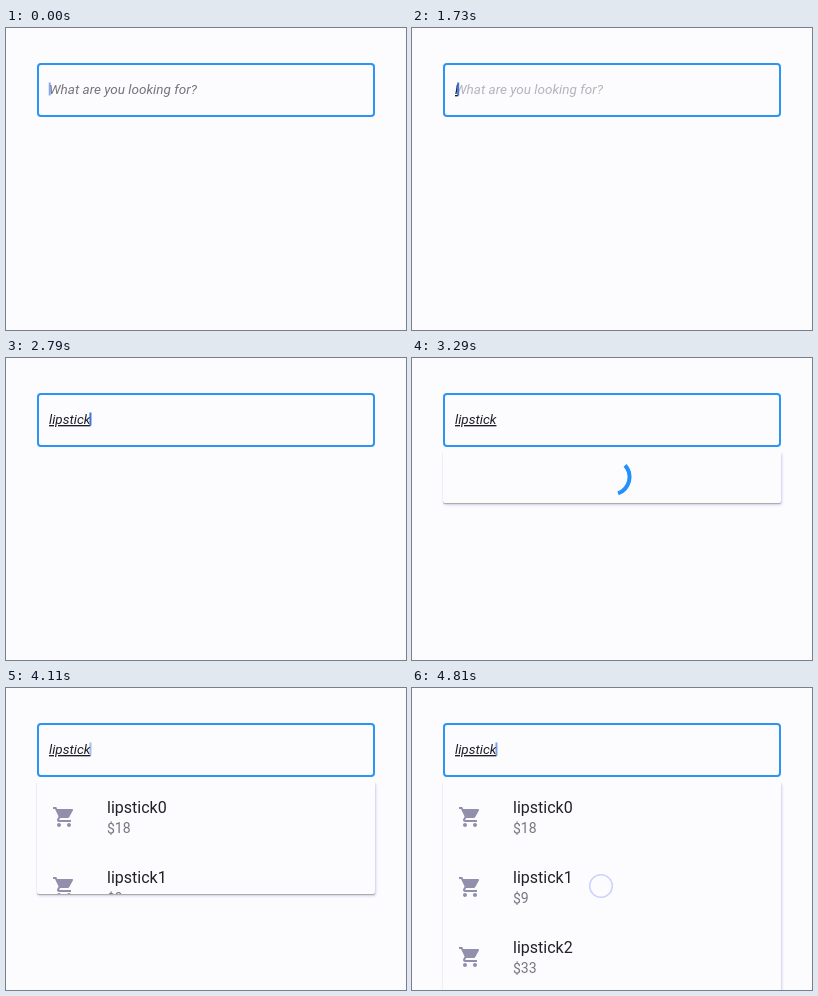
Write an HTML page that moves like this. It is 400 by 302 pixels and loops after 4850 ms.

```html
<!DOCTYPE html>
<html lang="en">
<head>
<meta charset="utf-8">
<style>
html, body { margin: 0; width: 100%; height: 100%; overflow: hidden; background: #fcfcff; }
body { position: relative; font-family: Roboto, sans-serif; }
svg { position: absolute; left: 0; top: 0; }
#panel {
  position: absolute; left: 31px; top: 94px; width: 338px; overflow: hidden;
  background: #fcfcff; border-radius: 0 0 2px 2px;
  box-shadow: 0 1px 1px #aaa89d, 1px 2px 3px #d5d0f2;
}
#panel svg { left: -31px; top: -94px; }
.field { font-size: 13.5px; font-style: italic; }
.title { font-size: 16px; fill: #212126; }
.price { font-size: 14px; fill: #77757f; }
</style>
</head>
<body>
<div id="panel">
  <svg width="400" height="310">
    <path id="spinner" fill="none" stroke="#2490fb" stroke-width="4"/>
    <g id="list"></g>
  </svg>
</div>
<svg width="400" height="302">
  <rect x="32" y="36" width="336" height="52" rx="3" fill="none" stroke="#2b94f5" stroke-width="2"/>
  <text id="hint" class="field" x="43" y="66" fill="#75747a">What are you looking for?</text>
  <text id="typed" class="field" x="43" y="66" fill="#1d1d24" text-decoration="underline"></text>
  <rect id="caret" y="54.5" width="2" height="13" fill="#3f74dc"/>
  <circle id="touch" cx="189" cy="198" r="11.3" fill="none" stroke="#cdd3fa" stroke-width="1.6"/>
</svg>
<script>
const LOOP = 4850, LOAD = 3080, RESULTS = 4055;
const WORD = "lipstick";
const KEYS = [1680, 1970, 2140, 2220, 2470, 2630, 2710, 2790];
// [time, opacity] points of the caret blink
const BLINK = [[-150, 0], [100, 1], [490, 1], [740, 0], [990, 0], [1240, 1], [1490, 1], [1679, .25], [1680, 1],
  [3040, 1], [3290, 0], [3490, 0], [3740, 1], [3980, 1], [4220, 0], [4730, 0], [4850, 1]];
const CART = "M7 18c-1.1 0-1.99.9-1.99 2S5.9 22 7 22s2-.9 2-2-.9-2-2-2zM1 2v2h2l3.6 7.59-1.35 2.45c-.16.28-.25.61-.25.96 0 1.1.9 2 2 2h12v-2H7.42c-.14 0-.25-.11-.25-.25l.03-.12.9-1.63h7.45c.75 0 1.41-.41 1.75-1.03l3.58-6.49c.08-.14.12-.31.12-.48 0-.55-.45-1-1-1H5.21l-.94-2H1zm16 16c-1.1 0-1.99.9-1.99 2s.89 2 1.99 2 2-.9 2-2-.9-2-2-2z";

const $ = id => document.getElementById(id);
const clamp = v => Math.max(0, Math.min(1, v));
const show = (id, on) => $(id).style.display = on ? "" : "none";

$("list").innerHTML = [18, 9, 33].map((price, i) => `<g transform="translate(0 ${70 * i})">
  <path transform="translate(46 117)" fill="#918fab" d="${CART}"/>
  <text class="title" x="101" y="125">${WORD}${i}</text>
  <text class="price" x="101" y="145">$${price}</text></g>`).join("");

// cubic-bezier(.4, 0, .2, 1)
function ease(x) {
  let lo = 0, hi = 1, s;
  for (let i = 0; i < 20; i++) {
    s = (lo + hi) / 2;
    const bx = 1.2 * s * (1 - s) ** 2 + .6 * s * s * (1 - s) + s ** 3;
    if (bx < x) lo = s; else hi = s;
  }
  return 3 * s * s * (1 - s) + s ** 3;
}

function blink(t) {
  const i = BLINK.findIndex(p => p[0] > t);
  const [t0, a] = BLINK[i - 1], [t1, b] = BLINK[i];
  return a + (b - a) * (t - t0) / (t1 - t0);
}

function spinnerPath(t) {
  const turn = t / 1333 % 1;
  const head = ease(clamp(turn * 2)), tail = ease(clamp(turn * 2 - 1));
  const from = Math.PI * (-.5 + 1.5 * tail + 2 * t / 2222 + .5 * turn);
  const sweep = Math.max(1.5 * Math.PI * (head - tail), .01);
  const at = a => `${200 + 17.5 * Math.cos(a)} ${119 + 17.5 * Math.sin(a)}`;
  return `M${at(from)}A17.5 17.5 0 ${+(sweep > Math.PI)} 1 ${at(from + sweep)}`;
}

function draw(t) {
  const typed = $("typed");
  typed.textContent = WORD.slice(0, KEYS.filter(k => k <= t).length);
  $("hint").style.opacity = clamp(1 - (t - 1660) / 150);
  $("caret").setAttribute("x", 42.7 + (typed.textContent ? typed.getComputedTextLength() - .7 : 0));
  $("caret").style.opacity = blink(t);

  const ready = t >= RESULTS;
  show("panel", t >= LOAD);
  show("spinner", !ready);
  show("list", ready);
  $("panel").style.height = (ready ? 212 * ease(clamp(.25 + (t - RESULTS) / 500)) : 51) + "px";
  $("spinner").setAttribute("d", spinnerPath(Math.max(0, t - LOAD)));
  $("touch").style.opacity = clamp((t - 4730) / 80);
}

function frame(now) {
  draw(now % LOOP);
  requestAnimationFrame(frame);
}
draw(0);
requestAnimationFrame(frame);
</script>
</body>
</html>
```
